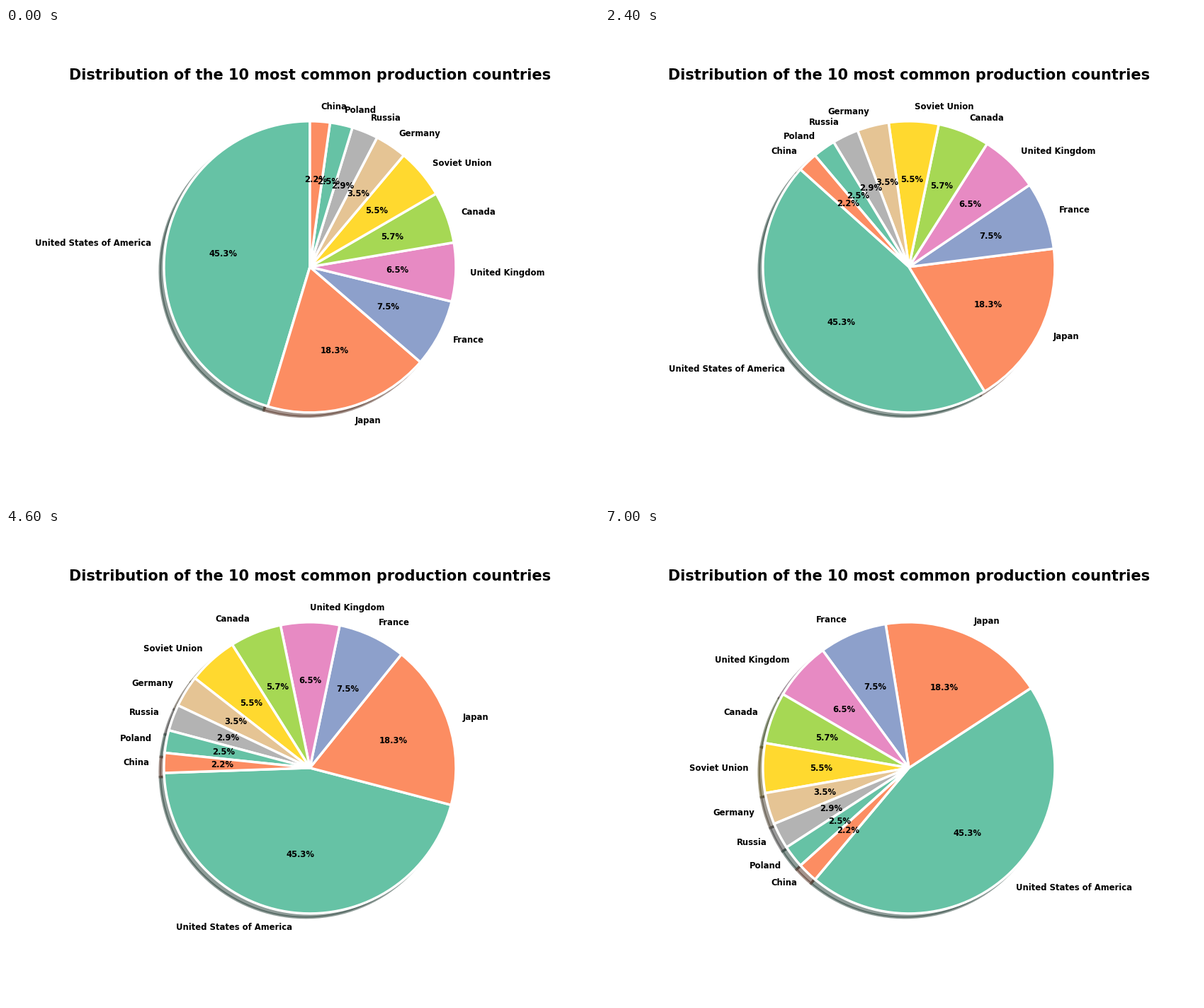
A matplotlib script for the animation above (7.2 s loop, 837x669 px).

```python
import matplotlib.pyplot as plt
from matplotlib.animation import FuncAnimation

DPI = 100
WIDTH, HEIGHT = 837, 669
SCALE = 0.837  # a 10 x 8 inch layout shrunk to the stage
FRAMES, INTERVAL = 36, 200
STEP = 4  # degrees per frame

SHARES = {
    "United States of America": 45.3,
    "Japan": 18.3,
    "France": 7.5,
    "United Kingdom": 6.5,
    "Canada": 5.7,
    "Soviet Union": 5.5,
    "Germany": 3.5,
    "Russia": 2.9,
    "Poland": 2.5,
    "China": 2.2,
}
COLORS = plt.get_cmap("Set2").colors

plt.rcParams["font.family"] = "DejaVu Sans"

# The tiny surplus keeps the pixel size from rounding down.
fig = plt.figure(figsize=((WIDTH + 0.001) / DPI, (HEIGHT + 0.001) / DPI),
                 dpi=DPI, facecolor="white")
ax = fig.add_axes([0.125, 0.11, 0.775, 0.77])


def draw(frame):
    ax.clear()
    ax.pie(
        list(SHARES.values()),
        labels=list(SHARES),
        colors=COLORS,
        autopct="%1.1f%%",
        startangle=90 + STEP * frame,
        shadow=True,
        wedgeprops={"edgecolor": "white", "linewidth": 3 * SCALE},
        textprops={"fontsize": 10 * SCALE, "fontweight": "bold",
                   "color": "black"},
    )
    ax.set_title("Distribution of the 10 most common production countries",
                 fontsize=18 * SCALE, fontweight="bold", pad=6 * SCALE)
    return []


anim = FuncAnimation(fig, draw, frames=FRAMES, interval=INTERVAL,
                     repeat=True, repeat_delay=0, blit=False)
plt.show()
```
